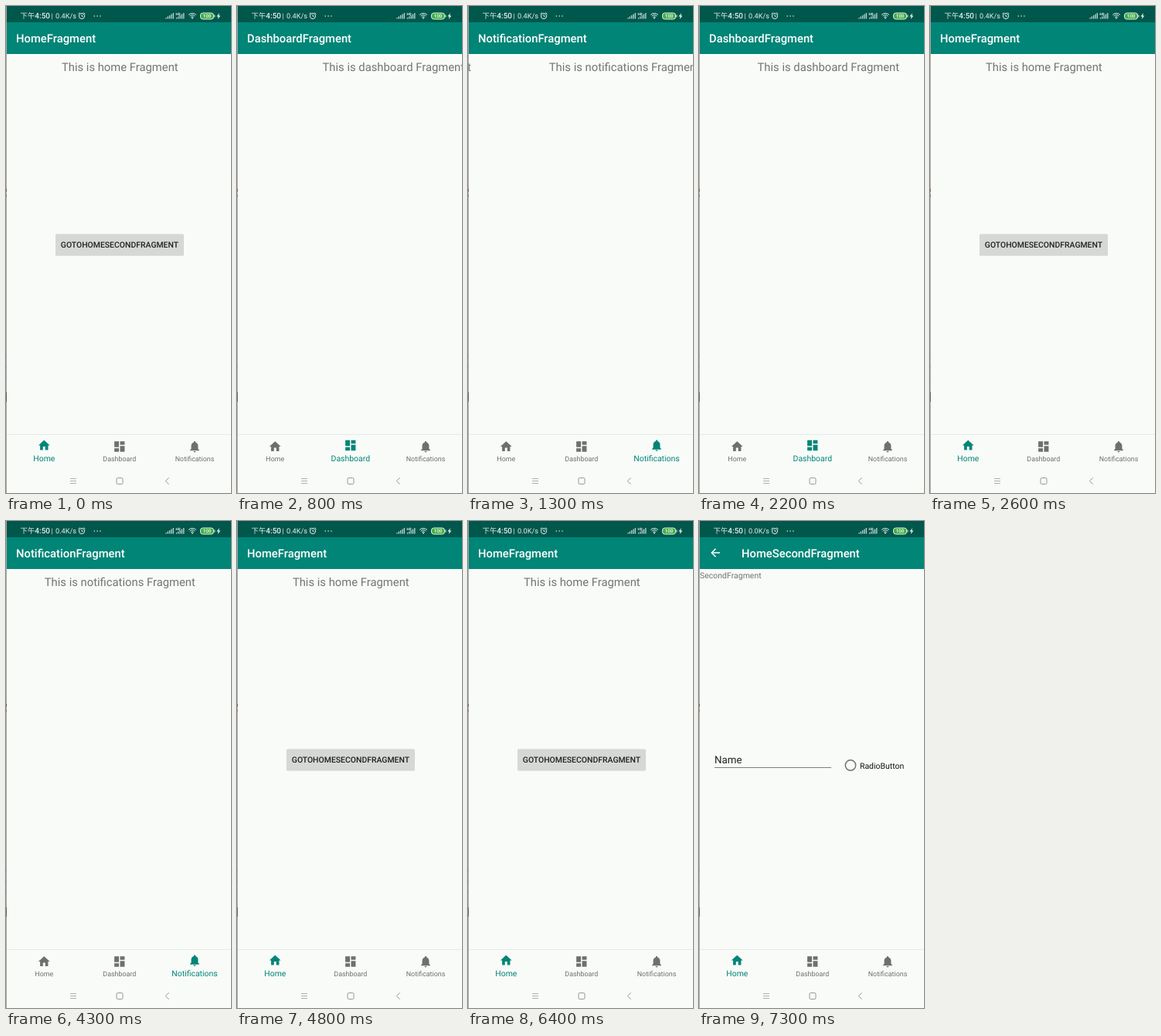
An HTML page with a canvas that plays this animation: 291x629 px, repeating every 8000 ms.

```html
<!DOCTYPE html>
<html lang="en">
<head>
<meta charset="utf-8">
<title>Fragment navigation</title>
<style>
  html, body { margin: 0; width: 100%; height: 100%; overflow: hidden; background: #f9fbf8; }
  canvas { display: block; width: 291px; height: 629px; }
</style>
</head>
<body>
<canvas id="stage" width="291" height="629"></canvas>
<script>
const ctx = document.getElementById('stage').getContext('2d');
const LOOP = 8000, STEP = 100, PAGE_W = 290;
const TEAL = '#008577', DARK_TEAL = '#00574b', PAPER = '#f9fbf8', GREY = '#6e706e';

const tabs = [
  { label: 'Home', title: 'HomeFragment', text: 'This is home Fragment', x: 49.3,
    icon: new Path2D('M10 20v-6h4v6h5v-8h3L12 3 2 12h3v8z') },
  { label: 'Dashboard', title: 'DashboardFragment', text: 'This is dashboard Fragment', x: 146.8,
    icon: new Path2D('M3 13h8V3H3zM3 21h8v-6H3zM13 21h8V11h-8zM13 3v6h8V3z') },
  { label: 'Notifications', title: 'NotificationFragment', text: 'This is notifications Fragment', x: 244,
    icon: new Path2D('M12 22c1.1 0 2-.9 2-2h-4c0 1.1.9 2 2 2zm6-6v-5c0-3.1-1.6-5.6-4.5-6.3V4c0-.8-.7-1.5-1.5-1.5s-1.5.7-1.5 1.5v.7C7.6 5.4 6 7.9 6 11v5l-2 2v1h16v-1z') }
];

// Finger swipes and bottom-bar taps that move the pager.
const moves = [
  { at: 600, from: 0, to: 1 },
  { at: 1100, from: 1, to: 2 },
  { at: 1700, from: 2, to: 1 },
  { at: 2200, from: 1, to: 0 },
  { at: 3200, from: 0, to: 1, tap: true },
  { at: 4000, from: 1, to: 2, tap: true },
  { at: 4500, from: 2, to: 0, tap: true }
];
const TAP_DELAY = 42;
const swipeCurve = [20, 130, 235, 277, 290];

function swipeProgress(age) {
  const k = Math.min(age / STEP, swipeCurve.length - 1);
  const i = Math.floor(k), a = swipeCurve[i], b = swipeCurve[i + 1] ?? a;
  return (a + (b - a) * (k - i)) / PAGE_W;
}

function tapProgress(age, distance) {
  const duration = 100 * (distance + 1);
  const p = Math.min(1, Math.max(0, (age - TAP_DELAY) / duration));
  return 1 - (1 - p) ** 5;
}

function pagerState(t) {
  const move = moves.filter(m => m.at <= t).pop();
  if (!move) return { scroll: 0, selected: 0 };
  const { from, to, tap } = move, age = t - move.at;
  const p = tap ? tapProgress(age, Math.abs(to - from)) : swipeProgress(age);
  const switched = age >= (tap ? TAP_DELAY : 200);
  return {
    scroll: from + (to - from) * p,
    selected: switched ? to : from,
    ripple: tap && age < 300 ? { tab: to, age } : null
  };
}

function rect(x, y, w, h, fill) {
  ctx.fillStyle = fill;
  ctx.fillRect(x, y, w, h);
}

function text(str, x, y, size, fill, { weight = 400, align = 'left', family = 'Roboto' } = {}) {
  ctx.font = `${weight} ${size}px "${family}", sans-serif`;
  ctx.textRendering = 'geometricPrecision';
  ctx.textAlign = align;
  ctx.fillStyle = fill;
  ctx.fillText(str, x, y);
}

function line(points, color, width) {
  ctx.beginPath();
  points.forEach(([x, y]) => ctx.lineTo(x, y));
  ctx.strokeStyle = color;
  ctx.lineWidth = width;
  ctx.stroke();
}

function circle(x, y, r, color, width) {
  ctx.beginPath();
  ctx.arc(x, y, r, 0, 7);
  if (width) {
    ctx.strokeStyle = color;
    ctx.lineWidth = width;
    ctx.stroke();
  } else {
    ctx.fillStyle = color;
    ctx.fill();
  }
}

function roundRect(x, y, w, h, r) {
  ctx.beginPath();
  ctx.roundRect(x, y, w, h, r);
}

function signal(x) {
  for (let i = 0; i < 5; i++) rect(x + i * 2.3, 15 - i * 1.5, 1.2, 1.5 + i * 1.5, '#d3e3df');
}

function statusBar(t) {
  const white = '#e4efec';
  rect(1, 0, 290, 21, DARK_TEAL);
  text('下午', 18.5, 16.2, 9.4, white, { family: 'Noto Sans CJK SC' });
  text('4:50', 37.3, 16.4, 10, white, { weight: 500 });
  text('|', 58.3, 15.8, 9, white);
  text(t < 6400 ? '0.4K/s' : '0.0K/s', 64, 16.2, 9.2, white);

  circle(98, 13, 3.6, white, 1);
  line([[98, 11], [98, 13.3], [99.8, 13.3]], white, 0.9);
  line([[93.6, 10.4], [95.6, 8.6]], white, 1);
  line([[102.4, 10.4], [100.4, 8.6]], white, 1);
  for (let i = 0; i < 3; i++) circle(114.3 + i * 3.8, 13, 0.8, white);

  signal(206.5);
  signal(220);
  text('HD', 219.5, 12, 4.5, white, { weight: 700 });

  for (const r of [2.5, 4.7, 6.9]) {
    ctx.beginPath();
    ctx.arc(241, 16.3, r, -Math.PI * 0.75, -Math.PI * 0.25);
    ctx.strokeStyle = white;
    ctx.lineWidth = 1;
    ctx.stroke();
  }
  circle(241, 15.7, 0.9, white);

  roundRect(251.5, 9, 17, 8, 3);
  ctx.fillStyle = '#3fae45';
  ctx.fill();
  ctx.strokeStyle = white;
  ctx.lineWidth = 1;
  ctx.stroke();
  rect(269.4, 11.5, 1, 3, white);
  text('100', 260, 15.3, 6.2, '#fff', { weight: 500, align: 'center' });
  ctx.fillStyle = white;
  ctx.fill(new Path2D('M276 9L272.4 13.5H274.5L273.8 17L277.4 12.4H275.2Z'));
}

function toolbar(title, hasBack) {
  rect(1, 21, 290, 41, TEAL);
  if (hasBack) {
    line([[27, 41], [16.8, 41]], '#fff', 1.5);
    line([[21.6, 35.8], [16.4, 41], [21.6, 46.2]], '#fff', 1.5);
  }
  text(title, hasBack ? 55 : 13, 47.2, 14.8, '#fff', { weight: 500 });
}

function homeButton(x, pressed) {
  roundRect(x + 64, 295, 166, 27.8, 1.5);
  ctx.fillStyle = '#d9dbd9';
  ctx.fill();
  roundRect(x + 64, 294.5, 166, 27.5, 1.5);
  ctx.fillStyle = pressed ? '#c6c8c6' : '#d6d8d6';
  ctx.fill();
  text('GOTOHOMESECONDFRAGMENT', x + 147, 312.2, 10.45, '#1f211f', { weight: 500, align: 'center' });
}

function pager(scroll, pressed) {
  tabs.forEach((tab, i) => {
    const x = (i - scroll) * PAGE_W;
    if (Math.abs(x) >= PAGE_W) return;
    text(tab.text, x + 147.3, 84, 14.8, '#737573', { align: 'center' });
    if (i === 0) homeButton(x, pressed);
  });
}

function secondPage() {
  text('SecondFragment', 1, 73.8, 10.5, '#737573');
  text('Name', 20, 313, 13.4, '#222422');
  rect(20, 318, 151, 1, '#7d7f7d');
  circle(196, 315.5, 6.7, GREY, 1.5);
  text('RadioButton', 208, 319.5, 10.45, '#111311');
}

function bottomBar(selected, ripple) {
  rect(1, 553, 290, 1, '#e3ece8');
  if (ripple) {
    const p = ripple.age / 300;
    ctx.save();
    ctx.beginPath();
    ctx.rect(1, 554, 290, 43);
    ctx.clip();
    circle(tabs[ripple.tab].x, 576, 30 + 19 * Math.min(1, p * 1.6), `rgba(0,0,0,${0.1 * (1 - p * 0.8)})`);
    ctx.restore();
  }
  tabs.forEach((tab, i) => {
    const active = i === selected, color = active ? TEAL : GREY;
    ctx.save();
    ctx.translate(tab.x - 8.9, active ? 558.6 : 560.1);
    ctx.scale(0.74, 0.74);
    ctx.fillStyle = color;
    ctx.fill(tab.icon);
    ctx.restore();
    text(tab.label, tab.x, 588.2, active ? 10.45 : 8.9, color, { align: 'center' });
  });
}

function systemKeys() {
  const color = '#8c8e8c';
  for (const y of [610, 613, 616]) rect(83, y + 0.2, 8, 0.7, color);
  roundRect(143, 609.5, 8, 8, 1.5);
  ctx.strokeStyle = color;
  ctx.lineWidth = 0.9;
  ctx.stroke();
  line([[210.7, 609.3], [206.3, 613.5], [210.7, 617.7]], color, 0.9);
}

function leftEdge() {
  rect(0, 0, 1, 629, '#a4a6a4');
  rect(0, 236, 1, 4, '#8a5a44');
  rect(0, 244, 1, 2, '#6f7170');
  rect(0, 450, 1, 2, '#6f9ad2');
  rect(0, 465, 1, 2, '#6f9ad2');
  rect(0, 477, 1, 2, '#6f9ad2');
  rect(0, 499, 1, 12, '#5c5e5c');
}

function draw(t) {
  const { scroll, selected, ripple } = pagerState(t);
  const onSecond = (t >= 5500 && t < 6400) || t >= 7300;
  const pressed = t >= 5400 && t < 5500;

  rect(0, 0, 291, 629, PAPER);
  if (onSecond) secondPage();
  else pager(scroll, pressed);
  statusBar(t);
  toolbar(onSecond ? 'HomeSecondFragment' : tabs[selected].title, onSecond);
  bottomBar(selected, ripple);
  systemKeys();
  leftEdge();
}

const start = performance.now();
function tick() {
  const t = (performance.now() - start) % LOOP;
  draw(Math.floor(t / STEP) * STEP);
  requestAnimationFrame(tick);
}
tick();
</script>
</body>
</html>
```
